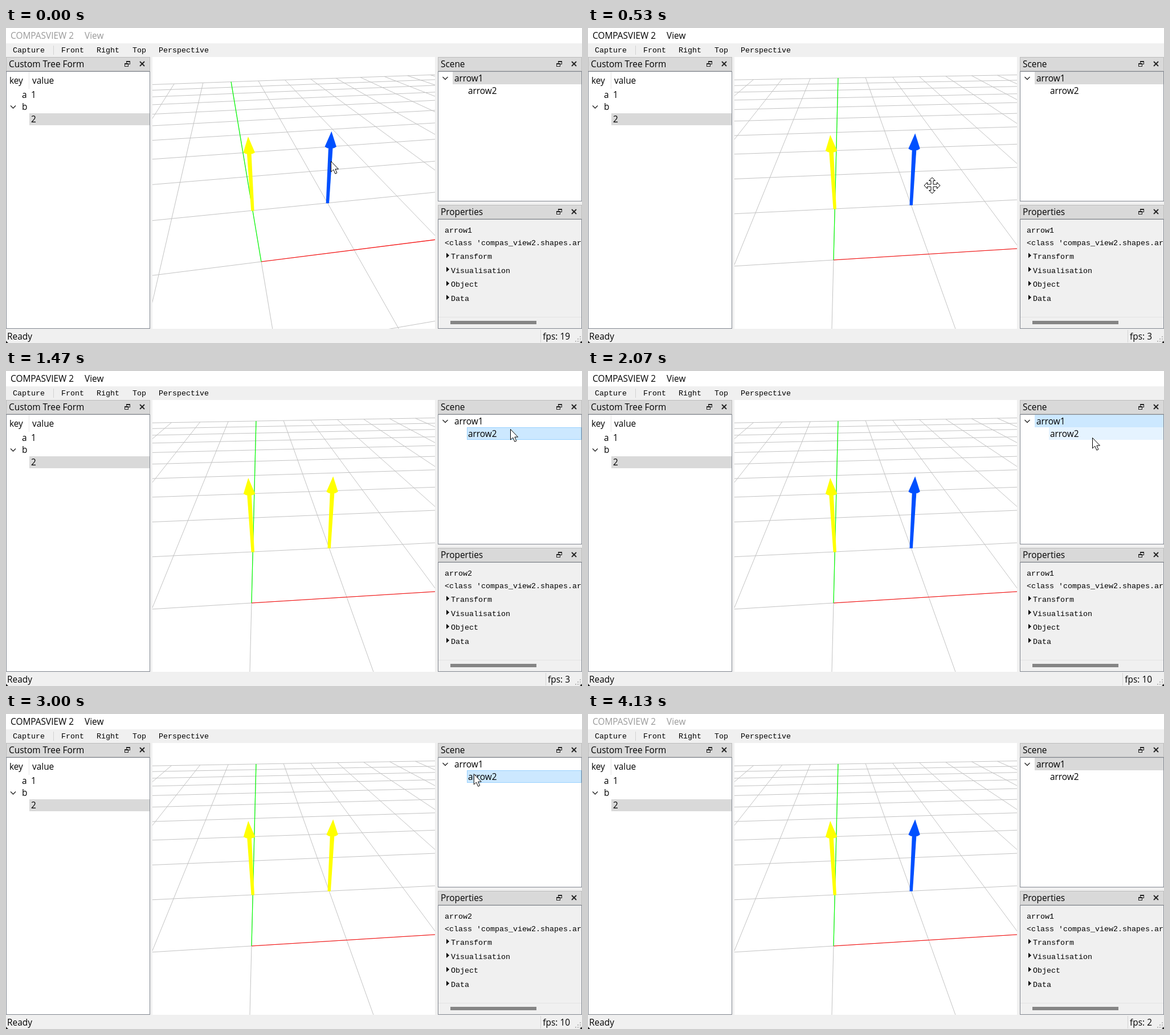
These frames come from a looping animation (1011 px wide and 554 px high, 4190 ms). An HTML page with a canvas:

```html
<!DOCTYPE html>
<html lang="en">
<head>
<meta charset="utf-8">
<title>Viewer</title>
<style>
html, body { margin: 0; width: 100%; height: 100%; overflow: hidden; background: #f0f0f0; }
canvas { display: block; }
</style>
</head>
<body>
<canvas id="stage" width="1011" height="554"></canvas>
<script>
const ctx = document.getElementById('stage').getContext('2d');
const LOOP = 4190, TICK = 1000 / 15;
const UI = '15.4px "Open Sans", "Noto Sans", sans-serif';
const MONO = '13.33px "Liberation Mono", monospace';

// Ground projection: homogeneous columns for origin, x axis and y axis.
const START = [[448, 411, 1], [193.2, -1.38, 0.0494], [96.6, -7.22, 0.2579]];
const END = [[431, 408, 1], [181.2, -0.92, 0.02376], [111.5, -9.8, 0.2522]];

// Pointer path: tick, x, y.
const PATH = [
  [0, 570, 234], [3, 570, 268], [8, 604, 277], [9, 605, 274], [16, 879, 110],
  [20, 879, 110], [22, 885, 102], [24, 885, 88], [28, 885, 88], [31, 885, 117],
  [38, 885, 117], [39, 883, 123], [41, 868, 150], [42, 868, 150], [46, 805, 90],
  [50, 805, 90], [51, 799, 106], [55, 150, 546], [56, 140, 580]
];

const mix = (a, b, s) => a + (b - a) * s;

function rect(x, y, w, h, fill, stroke) {
  ctx.fillStyle = fill;
  ctx.fillRect(x, y, w, h);
  if (!stroke) return;
  ctx.strokeStyle = stroke;
  ctx.lineWidth = 1;
  ctx.strokeRect(x + 0.5, y + 0.5, w - 1, h - 1);
}

function text(str, x, y, font = UI, color = '#000') {
  ctx.font = font;
  ctx.fillStyle = color;
  ctx.fillText(str, x, y);
}

function trace(points, closed) {
  ctx.beginPath();
  points.forEach(([x, y]) => ctx.lineTo(x, y));
  if (closed) ctx.closePath();
}

function line(points, color, width = 1) {
  trace(points);
  ctx.strokeStyle = color;
  ctx.lineWidth = width;
  ctx.stroke();
}

function shape(points, fill, stroke) {
  trace(points, true);
  ctx.fillStyle = fill;
  ctx.fill();
  if (!stroke) return;
  ctx.strokeStyle = stroke;
  ctx.lineWidth = 1;
  ctx.stroke();
}

function chevron(x, y) {
  line([[x - 4.5, y - 2.5], [x, y + 2], [x + 4.5, y - 2.5]], '#222', 1.3);
}

function dockTitle(label, x, y, w) {
  rect(x, y, w, 25, '#d9d9d9', '#bcbcbc');
  text(label, x + 5, y + 18);
  const right = x + w, mid = y + 12;
  ctx.strokeStyle = '#222';
  ctx.lineWidth = 1;
  ctx.strokeRect(right - 41.5, mid - 4.5, 6, 5);
  rect(right - 45, mid - 1, 7, 6, '#d9d9d9', '#222');
  rect(right - 42, mid - 5, 7, 2, '#222');
  rect(right - 45, mid - 1, 7, 2, '#222');
  const cx = right - 14, r = 4;
  line([[cx - r, mid - r], [cx + r, mid + r]], '#222', 1.8);
  line([[cx - r, mid + r], [cx + r, mid - r]], '#222', 1.8);
}

function pointerAt(tick) {
  const i = PATH.findIndex(p => p[0] > tick);
  if (i < 0) return PATH[PATH.length - 1].slice(1);
  if (i === 0) return PATH[0].slice(1);
  const a = PATH[i - 1], b = PATH[i], s = (tick - a[0]) / (b[0] - a[0]);
  return [mix(a[1], b[1], s), mix(a[2], b[2], s)];
}

function hoveredRow(tick) {
  const [x, y] = pointerAt(tick - 1);
  if (y >= 77 && y < 99 && x >= 784) return 1;
  if (y >= 99 && y < 121 && x >= 809) return 2;
  return 0;
}

function arrow([bx, by], dx, dy, color) {
  ctx.save();
  ctx.translate(bx, by);
  const nx = dx * 0.77, ny = dy * 0.77;
  shape([[-2.7, 0.5], [2.7, 0.5], [nx + 3.8, ny], [nx - 3.8, ny]], color);
  shape([[dx, dy], [nx + 10.2, ny - 2], [nx + 6, ny + 0.4], [nx, ny + 1],
    [nx - 6, ny + 0.4], [nx - 10.2, ny - 2]], color);
  ctx.restore();
}

function drawView(tick, selected) {
  const s = Math.min(1, Math.max(0, (tick - 3) / 5));
  const cols = START.map((col, i) => col.map((v, j) => mix(v, END[i][j], s)));
  const project = (x, y) => {
    const [u, v, w] = cols[0].map((o, j) => o + x * cols[1][j] + y * cols[2][j]);
    return [u / w, v / w];
  };
  ctx.save();
  ctx.beginPath();
  ctx.rect(257, 51, 496, 478);
  ctx.clip();
  rect(257, 51, 496, 478, '#fff');
  for (let i = -10; i <= 10; i++) {
    line([project(i, -1.5), project(i, 10)], '#c2c2c2');
    if (i >= -1) line([project(-10, i), project(10, i)], '#c2c2c2');
  }
  line([project(0, 0), project(10, 0)], '#f00', 1.2);
  line([project(0, 0), project(0, 10)], '#0f0', 1.2);
  arrow(project(0, 1), -8, -130, '#ff0');
  arrow(project(1, 1), 7, -126, selected === 2 ? '#ff0' : '#0050ff');
  ctx.restore();
}

function drawFrame(active) {
  rect(0, 0, 1011, 554, '#f0f0f0');
  rect(0, 0, 1011, 27, '#fff');
  const color = active ? '#000' : '#999';
  text('COMPASVIEW 2', 8, 19, UI, color);
  text('View', 138, 19, UI, color);
  [['Capture', 12], ['Front', 97], ['Right', 159], ['Top', 222], ['Perspective', 268]]
    .forEach(([label, x]) => text(label, x, 43, MONO));
  rect(83, 31, 1, 16, '#d2d2d2');
}

function drawTree() {
  dockTitle('Custom Tree Form', 0, 51, 253);
  rect(0, 76, 253, 453, '#fff', '#828790');
  rect(40, 77, 1, 30, '#e5e5e5');
  rect(41, 150, 211, 21, '#d9d9d9');
  text('key', 6, 98);
  text('value', 46, 98);
  text('a', 28, 123);
  text('1', 44, 123);
  text('b', 28, 144);
  text('2', 44, 166);
  chevron(12.5, 139);
}

function drawScene(tick, selected, hovered) {
  dockTitle('Scene', 758, 51, 253);
  rect(758, 76, 253, 229, '#fff', '#828790');
  const focused = tick >= 18 && tick < 62;
  [[1, 784, 77], [2, 809, 99]].forEach(([row, x, y]) => {
    const hover = row === hovered, w = 1010 - x;
    if (row === selected) {
      rect(x, y, w, 22, focused ? '#cce8ff' : '#d9d9d9', focused && hover && '#99d1ff');
    } else if (hover) {
      rect(x, y, w, 22, '#e5f3ff');
    }
  });
  chevron(771, 88.5);
  text('arrow1', 787, 94);
  text('arrow2', 811, 116);
}

function drawProperties(selected) {
  dockTitle('Properties', 758, 311, 253);
  rect(758, 336, 253, 193, '#f0f0f0', '#828790');
  ctx.save();
  ctx.beginPath();
  ctx.rect(759, 337, 251, 191);
  ctx.clip();
  text('arrow' + selected, 770, 360, MONO);
  text("<class 'compas_view2.shapes.arrow.Arrow'>", 770, 382, MONO);
  ['Transform', 'Visualisation', 'Object', 'Data'].forEach((label, i) => {
    const y = 406 + i * 24.6;
    text(label, 781, y, MONO);
    shape([[773, y - 10.5], [778, y - 6], [773, y - 1.5]], '#000');
  });
  rect(759, 508, 251, 1, '#e3e3e3');
  rect(780, 515, 151, 6, '#858585');
  ctx.restore();
}

function drawStatus(fps) {
  text('Ready', 2, 548);
  const label = 'fps: ' + fps;
  ctx.font = UI;
  const x = 990 - ctx.measureText(label).width;
  text(label, x, 548);
  rect(Math.round(x) - 4, 531, 1, 22, '#d4d4d4');
  for (let i = 0; i < 3; i++)
    for (let j = 2 - i; j < 3; j++) rect(999 + j * 4, 542 + i * 4, 2, 2, '#b8b8b8');
  shape([[0, 550], [4, 554], [0, 554]], '#222');
  shape([[1011, 550], [1007, 554], [1011, 554]], '#222');
}

function drawPointer(tick) {
  ctx.save();
  ctx.translate(...pointerAt(tick));
  if (tick >= 3 && tick < 9) {
    const arm = [[-2, -2], [-2, -8.5], [-5.5, -8.5], [0, -14], [5.5, -8.5], [2, -8.5]];
    const points = [];
    for (let q = 0; q < 4; q++) {
      const c = [1, 0, -1, 0][q], s = [0, 1, 0, -1][q];
      arm.forEach(([x, y]) => points.push([x * c - y * s, x * s + y * c]));
    }
    shape(points, '#fff', '#000');
  } else {
    ctx.translate(0.5, 0.5);
    shape([[0, 0], [0, 18.5], [4.3, 14.6], [7.4, 21.8], [10.4, 20.4], [7.4, 13.6], [13, 13.6]],
      '#fff', '#000');
  }
  ctx.restore();
}

function selectedAt(tick) {
  return (tick >= 18 && tick < 25) || (tick >= 34 && tick < 46) ? 2 : 1;
}

function fpsAt(tick) {
  return tick < 4 ? 19 : tick < 26 ? 3 : tick < 47 ? 10 : 2;
}

function render(now) {
  const tick = Math.floor((now % LOOP + 4) / TICK);
  const selected = selectedAt(tick);
  drawFrame(tick >= 3 && tick < 62);
  drawTree();
  drawView(tick, selected);
  drawScene(tick, selected, hoveredRow(tick));
  drawProperties(selected);
  drawStatus(fpsAt(tick));
  if (tick < 56) drawPointer(tick);
}

const began = performance.now();
(function loop() {
  render(performance.now() - began);
  requestAnimationFrame(loop);
})();
</script>
</body>
</html>
```
